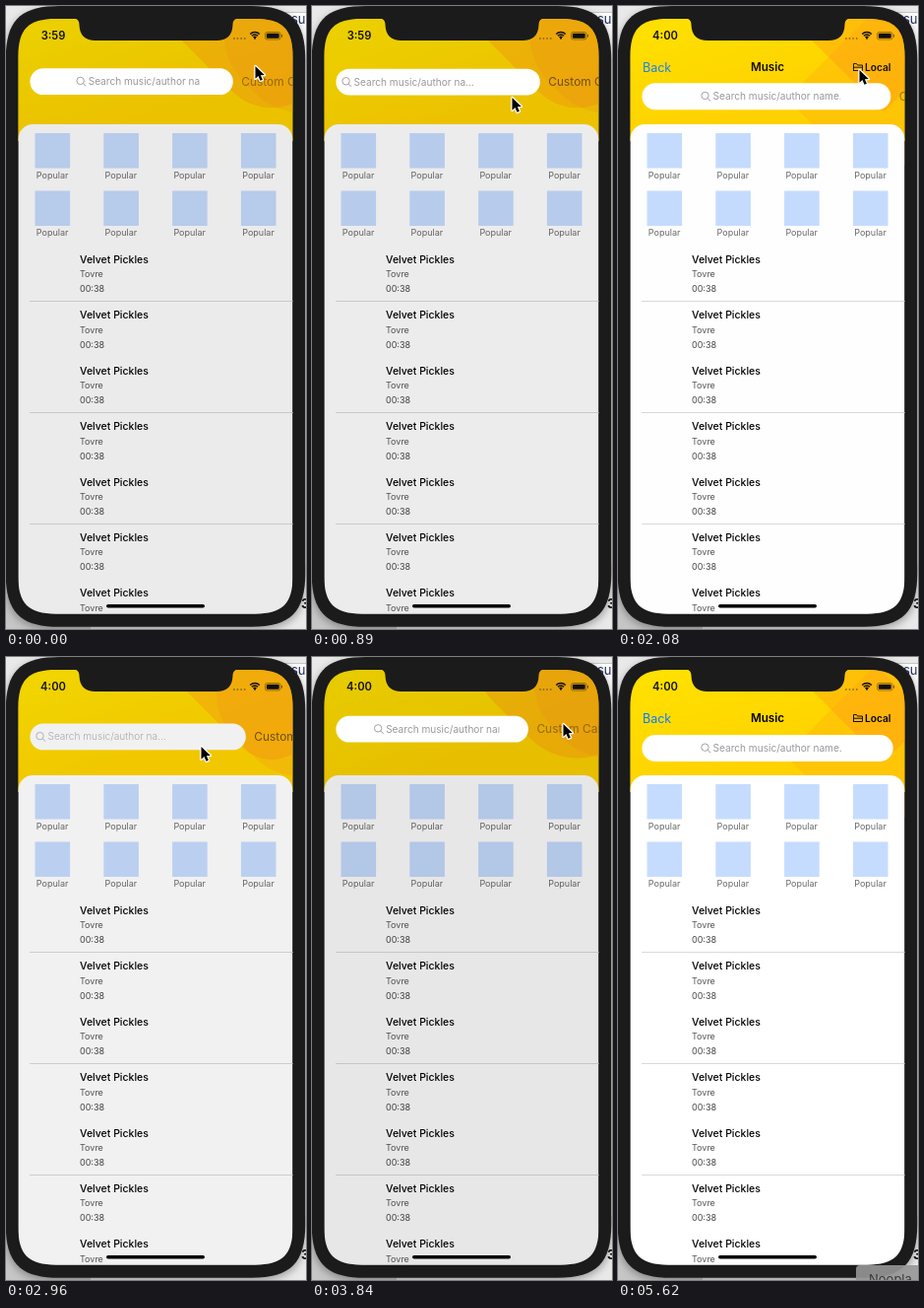
Animation, 305 px wide and 632 px high, one loop 5850 ms. Source, as an HTML page with a canvas:

```html
<!DOCTYPE html>
<html lang="en">
<head>
<meta charset="utf-8">
<title>Music search</title>
<style>
html, body { margin: 0; width: 100%; height: 100%; overflow: hidden; background: #e6e6e6; }
canvas { display: block; width: 305px; height: 632px; }
</style>
</head>
<body>
<canvas id="stage"></canvas>
<script>
const W = 305, H = 632, LOOP = 5850, TICK = 148, SPAN = 2.7;
const canvas = document.getElementById('stage');
const ctx = canvas.getContext('2d');
const ratio = window.devicePixelRatio || 1;
canvas.width = W * ratio;
canvas.height = H * ratio;

// Search field toggles: [start tick, opens]
const toggles = [[-1.32, 0], [4.64, 1], [11.555, 0], [18.87, 1], [24.89, 0]];
// Pointer path: [tick, x, y]
const path = [
  [0, 253, 60], [1, 253, 60], [3, 214, 90], [5, 203, 92], [8, 203, 92],
  [10, 243, 66], [12, 245, 64], [14, 245, 64], [16, 198, 90], [21, 198, 90],
  [24, 255, 67], [29, 255, 67], [30, 219, 220], [31, 247, 400], [32, 264, 560], [33, 276, 645]
];

const lerp = (a, b, t) => a + (b - a) * t;
const clamp = t => Math.max(0, Math.min(1, t));
const smooth = t => t * t * (3 - 2 * t);

function text(str, x, y, size, color, weight = 400, align = 'left') {
  ctx.font = `${weight} ${size}px Inter, Roboto, sans-serif`;
  ctx.textAlign = align;
  ctx.textBaseline = 'alphabetic';
  ctx.fillStyle = color;
  ctx.fillText(str, x, y + size * 0.36);
}

function box(x, y, w, h, r, color) {
  ctx.beginPath();
  ctx.roundRect(x, y, w, h, r);
  ctx.fillStyle = color;
  ctx.fill();
}

function line(points, color, width) {
  ctx.beginPath();
  points.forEach(([x, y]) => ctx.lineTo(x, y));
  ctx.strokeStyle = color;
  ctx.lineWidth = width;
  ctx.stroke();
}

// Rectangle with continuous-curvature corners
function squircle(x, y, w, h, r) {
  const e = 1.3 * r, q = 0.35 * r, x2 = x + w, y2 = y + h;
  ctx.beginPath();
  ctx.moveTo(x + e, y);
  ctx.lineTo(x2 - e, y);
  ctx.bezierCurveTo(x2 - q, y, x2, y + q, x2, y + e);
  ctx.lineTo(x2, y2 - e);
  ctx.bezierCurveTo(x2, y2 - q, x2 - q, y2, x2 - e, y2);
  ctx.lineTo(x + e, y2);
  ctx.bezierCurveTo(x + q, y2, x, y2 - q, x, y2 - e);
  ctx.lineTo(x, y + e);
  ctx.bezierCurveTo(x, y + q, x + q, y, x + e, y);
  ctx.closePath();
}

function searchState(tick) {
  const [start, open] = toggles.filter(s => s[0] <= tick).pop();
  const t = clamp((tick - start) / SPAN);
  return { t, open, active: open ? smooth(t) : 1 - smooth(t) };
}

function pointerAt(tick) {
  const i = path.findIndex(p => p[0] > tick);
  if (i < 0) return path[path.length - 1].slice(1);
  const a = path[i - 1], b = path[i];
  const t = (tick - a[0]) / (b[0] - a[0]);
  return [lerp(a[1], b[1], t), lerp(a[2], b[2], t)];
}

function desktop() {
  ctx.fillStyle = '#e9e9e9';
  ctx.fillRect(0, 0, W, H);
  ctx.fillStyle = '#fbfbfb';
  ctx.fillRect(250, 7, 55, 560);
  ctx.fillStyle = '#c6c6c6';
  ctx.fillRect(250, 6, 55, 1);
  ctx.fillRect(0, 560, 86, 72);
  text('su', 290, 13, 13, '#1d2b5c');
  text('3', 300, 606, 13, '#111', 700);
}

function phone() {
  ctx.save();
  ctx.shadowColor = 'rgba(0,0,0,.35)';
  ctx.shadowBlur = 8 * ratio;
  ctx.shadowOffsetY = 3 * ratio;
  squircle(-0.3, 0, 304.6, 629.7, 42);
  ctx.fillStyle = '#1b1b1c';
  ctx.fill();
  ctx.restore();
}

function blob(cx, cy, side, r, color) {
  ctx.save();
  ctx.translate(cx, cy);
  ctx.rotate(Math.PI / 4);
  box(-side / 2, -side / 2, side, side, r, color);
  ctx.restore();
}

function header(a) {
  const g = ctx.createLinearGradient(30, 10, 70, 135);
  g.addColorStop(0, '#ffe200');
  g.addColorStop(1, '#ffd200');
  ctx.fillStyle = g;
  ctx.fillRect(12, 12, 281, 125);
  const lead = 1 - (1 - a) ** 3;
  blob(lerp(262, 308, lead), lerp(100, 18, lead), lerp(130, 160, lead), 80 * lead, 'rgba(255,155,25,.24)');
  blob(270, lerp(5, -8, a), lerp(144, 216, a), 108 * a, 'rgba(255,145,25,.34)');
}

function sheet() {
  box(12.4, 120, 279, 520, [15, 15, 0, 0], '#fff');
  for (let i = 0; i < 8; i++) {
    const x = 29.5 + (i % 4) * 69.8, y = i < 4 ? 129 : 187.5;
    box(x, y, 35.6, 35.6, 0, '#c6dcff');
    text('Popular', x + 17.6, y + 42.5, 9, '#6a6a6a', 400, 'center');
  }
  for (let i = 0; i < 7; i++) {
    const y = 257 + i * 56.45;
    text('Velvet Pickles', 75, y, 10.5, '#000', 500);
    text('Tovre', 75, y + 15, 9, '#555');
    text('00:38', 75, y + 30, 9, '#444');
    if (i % 2 === 0) {
      ctx.fillStyle = '#dadadc';
      ctx.fillRect(24, Math.round(y + 42), 269, 1);
    }
  }
}

function navBar(alpha) {
  if (alpha <= 0) return;
  ctx.globalAlpha = alpha;
  text('Back', 25, 62, 12.5, '#0a7aff');
  text('Music', 152, 62, 11.7, '#000', 600, 'center');
  text('Local', 251, 62, 10.2, '#000', 600);
  line([[239.5, 65.5], [239.5, 58.5], [242.5, 58.5], [243.5, 60], [248.5, 60], [248.5, 65.5], [239, 65.5]], '#111', 1);
  line([[239.5, 62.2], [248.5, 62.2]], '#111', 1);
  ctx.globalAlpha = 1;
}

function magnifier(x, y, color) {
  ctx.beginPath();
  ctx.arc(x + 4.5, y - 0.7, 3.7, 0, 7);
  ctx.strokeStyle = color;
  ctx.lineWidth = 0.9;
  ctx.stroke();
  line([[x + 7.2, y + 2], [x + 10, y + 4.8]], color, 1);
}

function searchBar({ t, open, active }) {
  const right = 279.7 - 94.6 * active, y = 79.1 - 30.6 * active, mid = y + 13.3;
  const closed = 1 - active;
  const early = open && t < 0.45;
  const shade = early ? Math.round(255 * (1 - 0.15 * active)) : 255;
  const ink = early ? '#a9a9ac' : '#98989c';
  box(24.4, y, right - 24.4, 26.8, 13.4, `rgb(${shade},${shade},${shade})`);

  const shift = open || closed === 0 ? 0 : Math.min(1, 0.1 + 1.37 * closed);
  const x = 30 + 54 * shift;
  magnifier(x, mid, ink);
  ctx.save();
  if (!open && closed < 1) {
    ctx.beginPath();
    ctx.rect(24, y, right - 16 - 36 * closed - 24, 27);
    ctx.clip();
  }
  const label = open ? 'Search music/author na...' : 'Search music/author name.';
  text(label, x + 12.5, mid, 10.1, ink, early ? 300 : 400);
  ctx.restore();

  if (active > 0) {
    const cancelInk = open ? 'rgba(70,50,15,.75)' : 'rgba(80,55,10,.55)';
    text('Custom Cancel', right + 8.5, mid, 11.9, cancelInk);
  }
}

function statusBar(tick) {
  text(tick < 14 ? '3:59' : '4:00', 48, 30, 11.2, '#111', 600, 'center');
  for (let i = 0; i < 4; i++) box(231 + i * 3.6, 32, 1.8, 1.8, 1, 'rgba(70,55,0,.6)');
  ctx.lineWidth = 1.5;
  ctx.strokeStyle = '#111';
  for (const r of [2.2, 4.5, 6.8]) {
    ctx.beginPath();
    ctx.arc(253, 33.4, r, -Math.PI * 0.75, -Math.PI * 0.25);
    ctx.stroke();
  }
  box(252, 31.8, 2, 2, 1, '#111');
  ctx.beginPath();
  ctx.roundRect(263.5, 26.5, 15.5, 7.5, 2);
  ctx.strokeStyle = 'rgba(0,0,0,.45)';
  ctx.lineWidth = 0.8;
  ctx.stroke();
  box(264.8, 27.8, 12.9, 4.9, 1, '#111');
  box(279.9, 28.8, 1.1, 3, 0.5, 'rgba(0,0,0,.45)');
}

function notch() {
  ctx.beginPath();
  ctx.moveTo(68, 12);
  ctx.quadraticCurveTo(74.5, 13, 74.5, 19);
  ctx.quadraticCurveTo(75, 35, 91, 35);
  ctx.lineTo(214, 35);
  ctx.quadraticCurveTo(230, 35, 230.5, 19);
  ctx.quadraticCurveTo(230.5, 13, 237, 12);
  ctx.fillStyle = '#1b1b1c';
  ctx.fill();
}

function pointer([x, y]) {
  const shape = [[0, 0], [0, 14.5], [3.4, 11.4], [5.7, 16.8], [8.4, 15.7], [6.1, 10.4], [10.6, 10.2]];
  ctx.save();
  ctx.translate(x + 0.5, y + 1);
  ctx.scale(0.88, 0.88);
  ctx.beginPath();
  shape.forEach(([px, py]) => ctx.lineTo(px, py));
  ctx.closePath();
  ctx.lineJoin = 'round';
  ctx.strokeStyle = '#fff';
  ctx.lineWidth = 2.8;
  ctx.stroke();
  ctx.fillStyle = '#000';
  ctx.fill();
  ctx.restore();
}

function tooltip() {
  box(242, 617, 75, 30, 4, 'rgba(150,150,150,.9)');
  text('Noopla', 255, 631, 13, '#3a3a3a');
}

function draw(tick) {
  const search = searchState(tick);
  ctx.setTransform(ratio, 0, 0, ratio, 0, 0);
  desktop();
  phone();

  ctx.save();
  squircle(12.4, 13, 279.1, 603.7, 29.5);
  ctx.clip();
  header(search.active);
  sheet();
  ctx.fillStyle = `rgba(0,0,0,${0.15 * search.active})`;
  ctx.fillRect(0, 0, W, H);
  navBar(clamp((0.35 - search.active) / 0.35));
  searchBar(search);
  statusBar(tick);
  box(102, 607, 100, 3.6, 1.8, '#000');
  notch();
  ctx.restore();

  if (tick >= 38) tooltip();
  pointer(pointerAt(tick));
}

const start = performance.now();
function frame() {
  const time = (performance.now() - start) % LOOP;
  // The picture advances in even steps; the last one holds longer.
  draw(Math.min(38, Math.floor((time + 9) / TICK)));
  requestAnimationFrame(frame);
}
frame();
</script>
</body>
</html>
```
